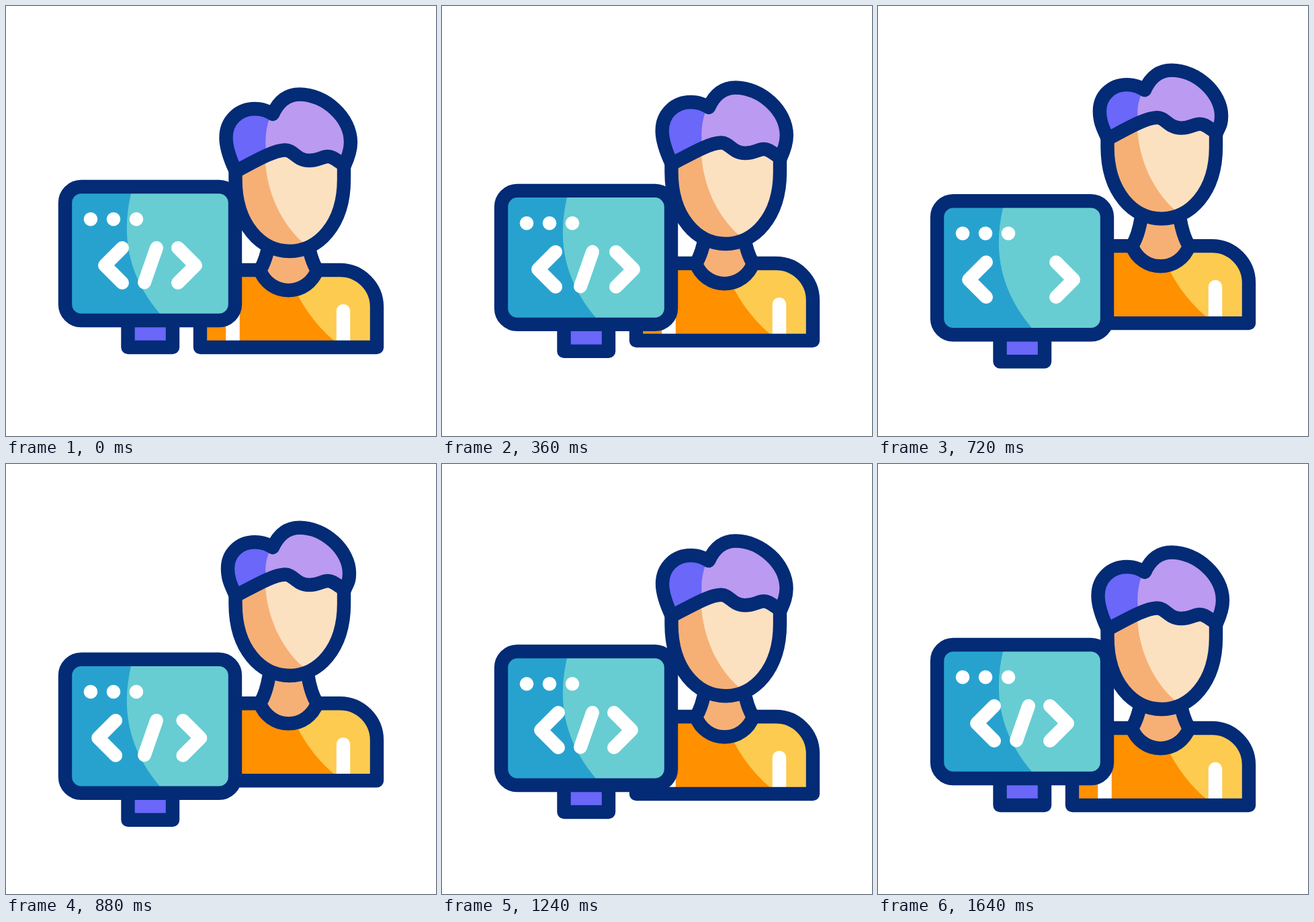
These frames come from a looping animation (640 by 640 pixels, 1.88 s). An HTML page with a canvas:

```html
<!DOCTYPE html>
<html lang="en">
<head>
<meta charset="utf-8">
<title>Developer at work</title>
<style>
  html, body { margin: 0; width: 100%; height: 100%; overflow: hidden; background: #fff; }
  canvas { display: block; width: 100vw; height: 100vh; }
</style>
</head>
<body>
<canvas id="stage" width="640" height="640"></canvas>
<script>
const ctx = document.getElementById('stage').getContext('2d');
const LOOP = 1880, STEP = 40;
const NAVY = '#032b76', WHITE = '#fff', PURPLE = '#6a67f9', LILAC = '#bb9af1',
      BLUE = '#27a2cf', TEAL = '#67cdd2', SKIN = '#f6b076', LIGHT = '#fce1c1',
      ORANGE = '#ff9000', YELLOW = '#fdcb50';

// Symmetric ease-in-out, equal to cubic-bezier(.42, 0, .58, 1)
function ease(x) {
  if (x <= 0) return 0;
  if (x >= 1) return 1;
  let lo = 0, hi = 1, s;
  for (let i = 0; i < 24; i++) {
    s = (lo + hi) / 2;
    const at = 3 * (1 - s) * s * (0.42 * (1 - s) + 0.58 * s) + s ** 3;
    if (at < x) lo = s; else hi = s;
  }
  return s * s * (3 - 2 * s);
}

const ramp = (t, from, to) => ease((t - from) / (to - from));
const thereAndBack = (t, a, b, c, d) => ramp(t, a, b) - ramp(t, c, d);

function fill(d, color) {
  ctx.fillStyle = color;
  ctx.fill(new Path2D(d));
}

function stroke(d, color = NAVY, width = 20.4) {
  ctx.strokeStyle = color;
  ctx.lineWidth = width;
  ctx.stroke(new Path2D(d));
}

function shifted(dx, dy, draw) {
  ctx.save();
  ctx.translate(dx, dy);
  draw();
  ctx.restore();
}

// Two-tone area: the shade is painted inside the shape only
function twoTone(shape, base, shade, color) {
  ctx.save();
  ctx.clip(new Path2D(shape));
  fill(shape, base);
  fill(shade, color);
  ctx.restore();
}

function drawTorso() {
  const shirt = 'M382 393H344A55 55 0 0 0 289 448V508H552V448A55 55 0 0 0 497 393H459';
  twoTone(shirt, ORANGE, 'M420 400Q445 462 488 498L500 508H570V380H420Z', YELLOW);
  stroke('M337.5 454V500M502 454V500', WHITE, 20.5);
  stroke(shirt + 'M289 508H552');
  const neck = 'M393 335L392 350C389 368 385 382 378 393A45 45 0 0 0 463 393C456 382 452 368 449 350L448 335';
  fill(neck, SKIN);
  stroke(neck);
}

function drawFace() {
  const face = 'M341.5 243V258C341.5 326 380 365 422 365C464 365 503 326 503 258V240';
  const skin = face + 'L479 224L451 230L415 214Z';
  twoTone(skin, SKIN, 'M386 205V230C388 275 408 322 442 352L460 370H520V205Z', LIGHT);
  stroke(face);
}

// The crown follows the body while the fringe follows the face
function drawHair(crown, fringe, squash) {
  const top = y => y + crown;
  const low = y => y + fringe;
  const mid = y => y + 0.7 * crown + 0.3 * fringe;
  const left = 327.5 + 2.5 * squash, right = 513 - 2 * squash;
  const hair =
    `M342 ${low(246)}C333 ${low(227)} ${left} ${mid(210)} ${left} ${mid(196)}` +
    `C${left} ${top(170)} 347 ${top(153)} 370 ${top(153)}` +
    `C383 ${top(153)} 390 ${top(157)} 397 ${top(161)}` +
    `C405 ${top(143)} 418 ${top(131.5)} 437 ${top(131.5)}` +
    `C475 ${top(131.5)} ${right} ${top(166)} ${right} ${mid(203)}` +
    `C${right} ${mid(215)} 509 ${low(226)} 504 ${low(237)}` +
    `C492 ${low(230)} 487 ${low(224)} 479 ${low(224)}` +
    `C470 ${low(224)} 466 ${low(230)} 451 ${low(230)}` +
    `C432 ${low(230)} 428 ${low(214)} 415 ${low(214.5)}` +
    `C397 ${low(215)} 368 ${low(232.5)} 342 ${low(246)}Z`;
  const shine = `M395 ${top(120)}L393 ${top(165)}Q384 ${mid(188)} 387 ${low(216)}` +
    `L390 ${low(250)}H530V${top(120)}Z`;
  twoTone(hair, PURPLE, shine, LILAC);
  stroke(hair);
}

function drawMonitor(spread, showSlash) {
  const stand = 'M181.5 460V508H248V460Z';
  fill(stand, PURPLE);
  stroke(stand);

  const screen = 'M112 269H317A24 24 0 0 1 341 293V444A24 24 0 0 1 317 468H112' +
    'A24 24 0 0 1 88 444V293A24 24 0 0 1 112 269Z';
  twoTone(screen, BLUE, 'M188 269L186 279C172 340 180 400 229 458L240 470H345V269Z', TEAL);
  stroke(screen);

  ctx.fillStyle = WHITE;
  for (const x of [126, 160, 194]) {
    ctx.beginPath();
    ctx.arc(x, 317.3, 10.3, 0, Math.PI * 2);
    ctx.fill();
  }
  shifted(-12 * spread, 0, () => stroke('M173 360L147 386L173 412', WHITE, 20));
  shifted(9 * spread, 0, () => stroke('M256 360L282 386L256 412', WHITE, 20));
  if (showSlash) stroke('M224 360L206 411.5', WHITE, 20);
}

function draw(t) {
  const lift = thereAndBack(t, 112, 800, 855, 1590);
  const stretch = lift * lift;
  const bodyY = -36.9 * lift;
  const faceY = bodyY - 13.2 * stretch;
  const spread = thereAndBack(t, 240, 540, 780, 1120);
  const showSlash = t < 640 || t >= 880;

  ctx.fillStyle = WHITE;
  ctx.fillRect(0, 0, 640, 640);
  ctx.lineCap = ctx.lineJoin = 'round';
  shifted(0, bodyY, drawTorso);
  shifted(0, faceY, drawFace);
  drawHair(bodyY, faceY, stretch);
  shifted(0, 21.8 * lift, () => drawMonitor(spread, showSlash));
}

function frame() {
  const t = performance.now() % LOOP;
  draw(Math.floor(t / STEP) * STEP);
  requestAnimationFrame(frame);
}
frame();
</script>
</body>
</html>
```
